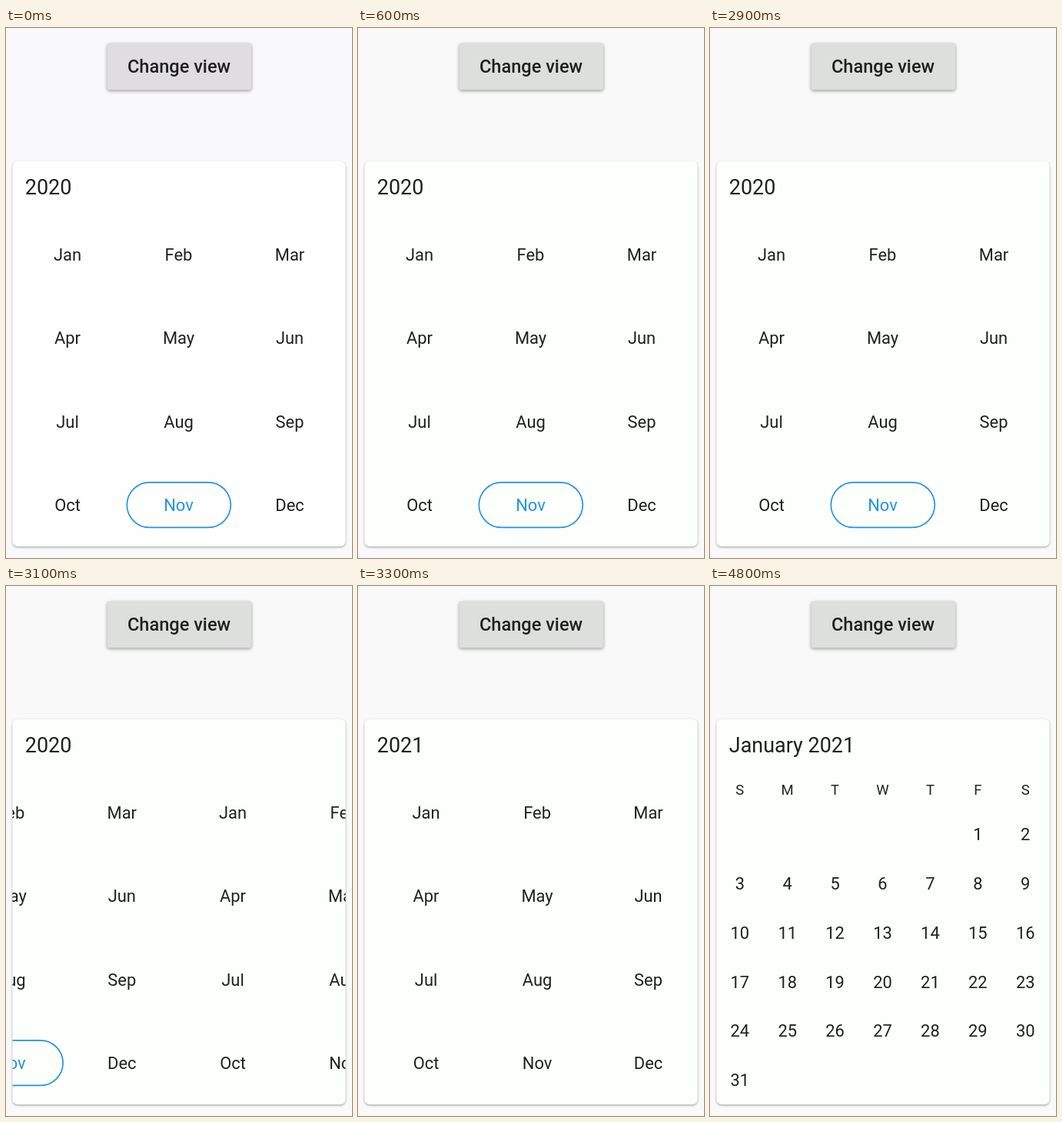
These frames come from a looping animation (450 by 688 pixels, 5.6 s). An HTML page with a canvas:

```html
<!DOCTYPE html>
<html lang="en">
<head>
<meta charset="utf-8">
<title>Calendar views</title>
<style>
  html, body { margin: 0; width: 100%; height: 100%; overflow: hidden; background: #f8f9f8; }
  canvas { display: block; width: 450px; height: 688px; }
</style>
</head>
<body>
<canvas id="stage"></canvas>
<script>
const W = 450, H = 688, LOOP = 5600, TICK = 100;
const SWIPE = 3100, SETTLED = 3400, MONTH_VIEW = 4800;
const UNIT = 1.685; // pixels per layout unit
const CARD = { x: 8.4, y: 173, w: 433.2, h: 500, r: 4 * UNIT };
const BUTTON = { x: 131.6, y: 19.8, w: 187.6, h: 60.4, r: 2 * UNIT };
const MONTHS = 'Jan Feb Mar Apr May Jun Jul Aug Sep Oct Nov Dec'.split(' ');
const INK = '#1f211f', BLUE = '#2492e2';
const COOL = { back: '#f9f8fb', card: '#fffeff', button: '#dfdde0' };
const WARM = { back: '#f8f9f8', card: '#fdfffd', button: '#dddfdc' };

const canvas = document.getElementById('stage');
const ctx = canvas.getContext('2d');
const dpr = window.devicePixelRatio || 1;
canvas.width = W * dpr;
canvas.height = H * dpr;

function text(str, x, y, size, { align = 'center', color = INK, weight = 400 } = {}) {
  ctx.font = `${weight} ${size * UNIT}px Roboto, sans-serif`;
  ctx.textAlign = align;
  ctx.fillStyle = color;
  ctx.fillText(str, x, y);
}

function boxPath({ x, y, w, h, r }) {
  ctx.beginPath();
  ctx.roundRect(x, y, w, h, r);
}

function raised(box, color, blur, drop, alpha) {
  ctx.save();
  ctx.shadowColor = `rgba(0, 0, 0, ${alpha})`;
  ctx.shadowBlur = blur * dpr;
  ctx.shadowOffsetY = drop * dpr;
  ctx.fillStyle = color;
  boxPath(box);
  ctx.fill();
  ctx.restore();
}

function drawYear(dx, selected) {
  MONTHS.forEach((name, i) => {
    const x = 80 + (i % 3) * 144.5 + dx;
    const y = 301.8 + Math.floor(i / 3) * 108.4;
    if (i === selected) {
      boxPath({ x: x - 67.2, y: 589.8, w: 135, h: 58.6, r: 29.3 });
      ctx.strokeStyle = BLUE;
      ctx.lineWidth = UNIT;
      ctx.stroke();
    }
    text(name, x, y, 13, { color: i === selected ? BLUE : INK });
  });
}

function drawMonth() {
  const column = i => 38.8 + i * 61.9;
  [...'SMTWTFS'].forEach((c, i) => text(c, column(i), 271, 11));
  for (let day = 1; day <= 31; day++) {
    const cell = day + 4; // the month begins on a Friday
    text(String(day), column(cell % 7), 329.8 + Math.floor(cell / 7) * 63.9, 13);
  }
}

// Distance the incoming year still has to travel.
function slideOffset(t) {
  if (t >= SETTLED) return 0;
  return 215 * Math.exp(-(t - SWIPE) / 62);
}

function draw(t) {
  const tone = t < TICK ? COOL : WARM;
  ctx.setTransform(dpr, 0, 0, dpr, 0, 0);
  ctx.fillStyle = tone.back;
  ctx.fillRect(0, 0, W, H);

  raised(BUTTON, tone.button, 4, 1.5, 0.38);
  text('Change view', 225, 58.3, 14, { weight: 500 });
  raised(CARD, tone.card, 3, 1.3, 0.34);

  const title = t >= MONTH_VIEW ? 'January 2021' : t > SWIPE ? '2021' : '2020';
  text(title, 24.8, 216, 16, { align: 'left' });

  ctx.save();
  boxPath(CARD);
  ctx.clip();
  if (t >= MONTH_VIEW) {
    drawMonth();
  } else if (t < SWIPE) {
    drawYear(0, 10);
  } else {
    const dx = slideOffset(t);
    if (dx) drawYear(dx - CARD.w, 10);
    drawYear(dx, -1);
  }
  ctx.restore();
}

const start = performance.now();
function loop() {
  const t = (performance.now() - start) % LOOP;
  draw(Math.floor(t / TICK) * TICK);
  requestAnimationFrame(loop);
}
loop();
</script>
</body>
</html>
```
